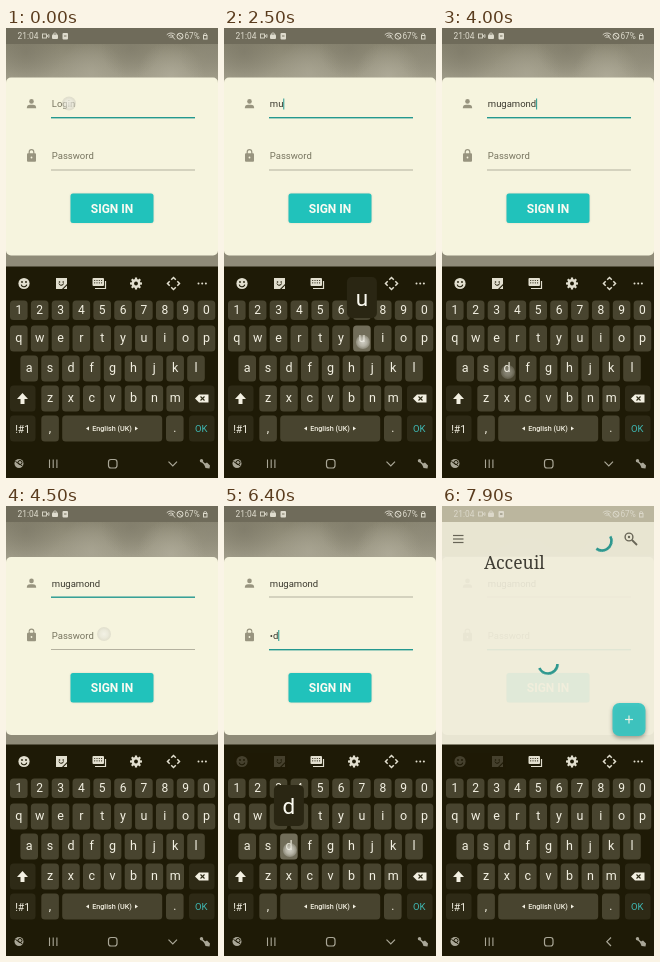
These frames come from a looping animation (212x450 px, 8 s). An HTML page with a canvas:

```html
<!DOCTYPE html>
<html lang="en">
<head>
<meta charset="utf-8">
<title>Sign in</title>
<style>
html, body { margin: 0; width: 100%; height: 100%; overflow: hidden; background: #1e1a06; }
canvas { display: block; width: 212px; height: 450px; }
</style>
</head>
<body>
<canvas id="stage"></canvas>
<script>
const W = 212, H = 450, LOOP = 8000;
const TEAL = '#21c2bb', DARK_TEAL = '#24988f', INK = '#3b392f', LIGHT = '#f3f0e2';
const BOARD = '#1e1a06', KEY = '#48442f', SIDE_KEY = '#2e2a16', STATUS = '#dedbcd';
const SANS = 'Roboto, "Open Sans", sans-serif';
const canvas = document.getElementById('stage');
const c = canvas.getContext('2d');
const scale = window.devicePixelRatio || 1;
canvas.width = W * scale;
canvas.height = H * scale;

const clamp = v => Math.max(0, Math.min(1, v));
const ramp = (t, a, b) => clamp((t - a) / (b - a));

function box(x, y, w, h, r, fill) {
  c.beginPath();
  c.roundRect(x, y, w, h, r);
  c.fillStyle = fill;
  c.fill();
}
function disc(x, y, r, fill) {
  c.beginPath();
  c.arc(x, y, r, 0, 7);
  c.fillStyle = fill;
  c.fill();
}
function ring(x, y, r, color, width = 1, from = 0, to = Math.PI * 2) {
  c.beginPath();
  c.arc(x, y, r, from, to);
  c.strokeStyle = color;
  c.lineWidth = width;
  c.stroke();
}
function path(points, color, width = 1) {
  c.beginPath();
  for (let i = 0; i < points.length; i += 2) c.lineTo(points[i], points[i + 1]);
  c.strokeStyle = color;
  c.lineWidth = width;
  c.stroke();
}
function poly(points, fill) {
  c.beginPath();
  for (let i = 0; i < points.length; i += 2) c.lineTo(points[i], points[i + 1]);
  c.fillStyle = fill;
  c.fill();
}
function text(s, x, y, size, color, align = 'left', weight = 400, family = SANS) {
  c.font = `${weight} ${size}px ${family}`;
  c.textAlign = align;
  c.fillStyle = color;
  c.fillText(s, x, y);
}
function faded(alpha, draw) {
  c.save();
  c.globalAlpha *= alpha;
  draw();
  c.restore();
}

// Keyboard layout: key name -> rectangle
const keys = {};
function addRow(chars, x, y, h) {
  [...chars].forEach((ch, i) => { keys[ch] = { x: x + i * 20.85, y, w: 17.6, h }; });
}
addRow('1234567890', 4, 272.5, 19.5);
addRow('qwertyuiop', 4, 297.5, 26);
addRow('asdfghjkl', 14.4, 327.5, 26);
addRow('zxcvbnm', 35.3, 357.5, 26);

const NAME = 'mugamond', PASS = 'admin';
const taps = [];
function addTaps(word, times) {
  [...word].forEach((ch, i) => taps.push({ ch, at: times[i] }));
}
addTaps(NAME, [1420, 2400, 2880, 2990, 3130, 3380, 3560, 3720]);
addTaps(PASS, [5960, 6280, 6520, 6640, 6750]);
const COMMIT = 100, HOLD = 170, FADE = 250, SUBMIT = 7600;
const typed = (t, from, to) => taps.slice(from, to).filter(k => t >= k.at + COMMIT);

function touch(t, at, x, y) {
  if (t < at || t > at + HOLD + FADE) return;
  faded(1 - ramp(t, at + HOLD, at + HOLD + FADE), () => {
    const g = c.createRadialGradient(x, y, 0, x, y, 7);
    g.addColorStop(0, 'rgba(242,241,234,.75)');
    g.addColorStop(.6, 'rgba(225,224,214,.6)');
    g.addColorStop(1, 'rgba(190,188,176,.4)');
    disc(x, y, 7, g);
  });
}

function sky() {
  const g = c.createLinearGradient(0, 14, 0, 50);
  g.addColorStop(0, '#87836f');
  g.addColorStop(1, '#a19d8a');
  c.fillStyle = g;
  c.fillRect(0, 0, W, 240);
  for (const [x, y, r, tone] of [[20, 24, 36, '122,118,101'], [85, 46, 34, '174,170,152'], [125, 20, 30, '126,122,105'], [165, 48, 34, '182,178,160'], [205, 24, 32, '140,136,119']]) {
    const b = c.createRadialGradient(x, y, 0, x, y, r);
    b.addColorStop(0, `rgba(${tone},.6)`);
    b.addColorStop(1, `rgba(${tone},0)`);
    c.fillStyle = b;
    c.fillRect(0, 15, W, 50);
  }
  c.fillStyle = '#8f8b78';
  c.fillRect(0, 215, W, 24);
}

function statusBar(back) {
  c.fillStyle = back;
  c.fillRect(0, 0, W, 16);
  text('21:04', 11.5, 11.2, 8.4, STATUS);
  c.strokeStyle = STATUS;
  c.lineWidth = .9;
  c.strokeRect(36.5, 6, 4, 4);
  path([41, 8, 43, 6.5, 43, 9.5, 41, 8], STATUS, .8);
  box(46, 6.5, 6, 4.5, 1, STATUS);
  ring(49, 6.5, 1.6, STATUS, .8);
  box(56.5, 5, 5.5, 6.5, 1, STATUS);
  path([58, 8, 60.5, 8], '#77735f', 1);
  for (const r of [2, 4, 6]) ring(165, 11, r, STATUS, .9, -2.35, -.8);
  path([166, 8, 169, 11.5], STATUS, .9);
  ring(174, 8.2, 3, STATUS, 1);
  path([172, 6.2, 176, 10.2], STATUS, .9);
  text('67%', 178.5, 11.2, 8.2, STATUS);
  c.strokeStyle = STATUS;
  c.lineWidth = 1;
  c.strokeRect(197.5, 7.5, 3.5, 3.5);
  ring(199.2, 7, 1.5, STATUS, .8, Math.PI, 0);
}

function form(t) {
  sky();
  statusBar('#6f6b5a');
  const focus = t >= 4600;
  const dy = t >= 4450 ? 1.5 : 0;
  c.save();
  c.translate(0, dy);
  box(0, 49.5, W, 178, 5, '#f6f4de');

  const grey = '#98947f';
  disc(25.5, 73.4, 2.3, grey);
  box(20.8, 76.8, 9.4, 3.4, [4, 4, 0, 0], grey);
  box(21, 125.3, 9, 8.5, 1, grey);
  path([23.2, 126, 23.2, 124], grey, 1.2);
  path([27.8, 126, 27.8, 124], grey, 1.2);
  ring(25.5, 124, 2.3, grey, 1.2, Math.PI, 0);
  disc(25.5, 129.5, .9, '#f6f4de');

  const name = typed(t, 0, NAME.length).map(k => k.ch).join('');
  const done = t < SUBMIT ? typed(t, NAME.length) : [];
  const pass = done.map((k, i) => i === done.length - 1 && t < k.at + 200 ? k.ch : '•').join('');
  field(name, 'Login', 79, 89, !focus);
  field(pass, 'Password', 131.2, 141.5, focus);

  const blinkFrom = focus ? 5200 : 100;
  const last = typed(t, 0).pop();
  const start = last && last.at + COMMIT > blinkFrom ? last.at + COMMIT : blinkFrom;
  if (((t - start) % 1000 + 1000) % 1000 < 500 && t > 100 && t < 7300) {
    c.font = `400 9.5px ${SANS}`;
    const x = 45.7 + c.measureText(focus ? pass : name).width;
    c.fillStyle = DARK_TEAL;
    c.fillRect(x, focus ? 122.5 : 70.5, 1, 11);
  }

  c.shadowColor = 'rgba(60,60,40,.2)';
  c.shadowBlur = 2 * scale;
  box(64.5, 165.5, 83, 29.5, 2.5, TEAL);
  c.shadowColor = 'transparent';
  if (t > 7280) {
    c.save();
    c.beginPath();
    c.roundRect(64.5, 165.5, 83, 29.5, 2.5);
    c.clip();
    disc(106, 180, 8 + 42 * ramp(t, 7280, 7500), `rgba(255,255,255,${.25 * (1 - ramp(t, 7450, 7650))})`);
    c.restore();
  }
  text('SIGN IN', 106, 184.8, 12, '#fbfbf2', 'center', 700);
  c.restore();

  touch(t, -60, 63, 75.5);
  touch(t, 4300, 98, 128);
  touch(t, 7250, 106, 182);
}

function field(value, hint, base, line, active) {
  text(value || hint, 45.8, base, 9.5, value ? INK : '#77745f');
  c.fillStyle = active ? DARK_TEAL : '#b4b19f';
  c.fillRect(45, line, 144, active ? 1.4 : 1);
}

function spinner(x, y, from) {
  ring(x, y, 9.5, '#1d9088', 2.6, from, from + 2.7);
  c.save();
  c.setLineDash([1, 1.4]);
  ring(x, y, 10.6, '#6fb9b0', 1, from, from + 2.7);
  c.restore();
}

function home(t) {
  c.fillStyle = '#f0eddb';
  c.fillRect(0, 0, W, 239);
  c.fillStyle = '#e9e5d2';
  c.fillRect(0, 16, W, 34);
  statusBar('#b8b29b');
  for (let i = 0; i < 3; i++) path([11, 29.5 + i * 3.5, 21.5, 29.5 + i * 3.5], '#5d5a4c', 1.2);
  ring(187, 31, 3.9, '#5d5a4c', 1.4);
  path([190, 34, 195, 39], '#5d5a4c', 1.8);
  disc(187, 31, 1.2, '#5d5a4c');
  text('Acceuil', 42, 62.5, 17.5, '#302e26', 'left', 400, '"Noto Serif", serif');
  const turn = (t - 7900) / 220;
  spinner(160, 35, turn - .5);
  spinner(106, 158, turn);
  c.save();
  c.shadowColor = 'rgba(50,50,40,.45)';
  c.shadowBlur = 4 * scale;
  c.shadowOffsetY = 2 * scale;
  box(170.5, 197, 33, 33, 7, '#35c6c2');
  c.restore();
  path([183, 213.5, 191, 213.5], '#f4f4e8', 1.2);
  path([187, 209.5, 187, 217.5], '#f4f4e8', 1.2);
}

function toolbar(t) {
  const col = '#e2dfcf';
  disc(18, 255.5, 5.6, col);
  disc(16, 254, .9, BOARD);
  disc(20, 254, .9, BOARD);
  ring(18, 256, 2.8, BOARD, 1.1, .2, 2.95);
  poly([50, 250, 61, 250, 61, 256, 56, 261, 50, 261], col);
  disc(53.5, 254, .8, BOARD);
  disc(57.2, 254, .8, BOARD);
  ring(55.2, 255, 2.3, BOARD, 1, .2, 2.9);
  poly([57.5, 261, 61, 257.5, 61, 261], col);
  if (t >= 5400) faded(.8, () => box(10, 247, 54, 17, 0, BOARD));

  box(86.5, 250, 11.5, 8, 1, col);
  for (let i = 0; i < 4; i++) {
    disc(88.7 + i * 2.3, 252.5, .6, BOARD);
    disc(88.7 + i * 2.3, 254.8, .6, BOARD);
  }
  path([89, 260.5, 99.5, 260.5, 99.5, 253], col, 1.2);
  for (let i = 0; i < 8; i++) {
    const a = i * Math.PI / 4;
    path([130, 255.5, 130 + 6 * Math.cos(a), 255.5 + 6 * Math.sin(a)], col, 2.2);
  }
  disc(130, 255.5, 4.5, col);
  disc(130, 255.5, 1.9, BOARD);
  for (let i = 0; i < 4; i++) {
    c.save();
    c.translate(167.5, 255.5);
    c.rotate(i * Math.PI / 2);
    path([-2.3, -3.8, 0, -6, 2.3, -3.8], col, 1.5);
    c.restore();
  }
  for (let i = 0; i < 3; i++) disc(192.5 + i * 3.7, 255.5, 1, col);
}

function keyboard(t) {
  c.fillStyle = BOARD;
  c.fillRect(0, 238.5, W, H - 238.5);
  toolbar(t);
  const down = taps.filter(k => t >= k.at && t < k.at + HOLD).pop();
  for (const [ch, k] of Object.entries(keys)) {
    box(k.x, k.y, k.w, k.h, 3.5, down && down.ch === ch ? '#716d59' : KEY);
    const digit = k.h < 20;
    text(ch, k.x + k.w / 2, k.y + k.h / 2 + (digit ? 4.2 : 3.8), digit ? 12 : 12.5, LIGHT, 'center');
  }
  box(4, 357.5, 25.5, 26, 3.5, SIDE_KEY);
  poly([16.5, 365, 22, 371, 18.5, 371, 18.5, 376, 14.5, 376, 14.5, 371, 11, 371], LIGHT);
  box(183, 357.5, 25.5, 26, 3.5, SIDE_KEY);
  poly([189, 370.5, 193, 366.5, 202.5, 366.5, 202.5, 374.5, 193, 374.5], LIGHT);
  path([194.5, 368.5, 198.5, 372.5], SIDE_KEY, 1.1);
  path([198.5, 368.5, 194.5, 372.5], SIDE_KEY, 1.1);

  for (const x of [4, 183]) box(x, 387.5, 25.5, 26, 3.5, SIDE_KEY);
  for (const [x, w] of [[35.3, 17.6], [56.2, 100], [160, 17.6]]) box(x, 387.5, w, 26, 3.5, KEY);
  text('!#1', 16.7, 404.5, 10.5, LIGHT, 'center');
  text(',', 44, 403.5, 12, LIGHT, 'center');
  text('English (UK)', 106, 403, 7.2, LIGHT, 'center', 500);
  poly([80, 400.5, 83, 398.5, 83, 402.5], LIGHT);
  poly([132, 400.5, 129, 398.5, 129, 402.5], LIGHT);
  text('.', 168.8, 403.5, 12, LIGHT, 'center');
  text('OK', 195.2, 404, 9.5, '#3fb9b4', 'center');

  navBar(t);
  if (down) {
    const k = keys[down.ch], x = k.x + k.w / 2;
    box(x - 15, k.y - 48.5, 30, 41, 5, '#2a2613');
    text(down.ch, x, k.y - 20, 22.5, '#fbfaf0', 'center');
  }
  for (const tap of taps) {
    const k = keys[tap.ch];
    const dx = tap.ch === 'a' ? -7 : tap.ch === 'm' ? 2 : 1;
    touch(t, tap.at, k.x + k.w / 2 + dx, k.y + k.h / 2 + (tap.ch === 'a' ? -5 : 3.5));
  }
}

function navBar(t) {
  const col = '#aaa797';
  disc(13, 435.5, 4.5, col);
  path([9.5, 433.5, 16.5, 438], BOARD, 1);
  ring(14, 434.5, 2, BOARD, 1);
  for (let i = 0; i < 3; i++) path([43.5 + i * 3.7, 431.5, 43.5 + i * 3.7, 440], col, 1.1);
  c.beginPath();
  c.roundRect(102.5, 431.5, 8.5, 8.5, 2.5);
  c.strokeStyle = col;
  c.lineWidth = 1.2;
  c.stroke();
  path(t >= 7850 ? [169, 431.5, 164.8, 435.7, 169, 440] : [162.5, 433.7, 166.8, 438, 171, 433.7], col, 1.2);
  disc(195.5, 432.8, 1.7, col);
  path([195.5, 433, 200, 437.5], col, 1.6);
  poly([198, 436, 201, 434.5, 204, 437.5, 203.5, 440.5, 199.5, 440], col);
}

function draw(t) {
  c.setTransform(scale, 0, 0, scale, 0, 0);
  c.globalAlpha = 1;
  form(t);
  const shown = .92 * ramp(t, 7720, 7890);
  if (shown) faded(shown, () => home(t));
  keyboard(t);
}

function tick(now) {
  draw(now % LOOP);
  requestAnimationFrame(tick);
}
requestAnimationFrame(tick);
</script>
</body>
</html>
```
